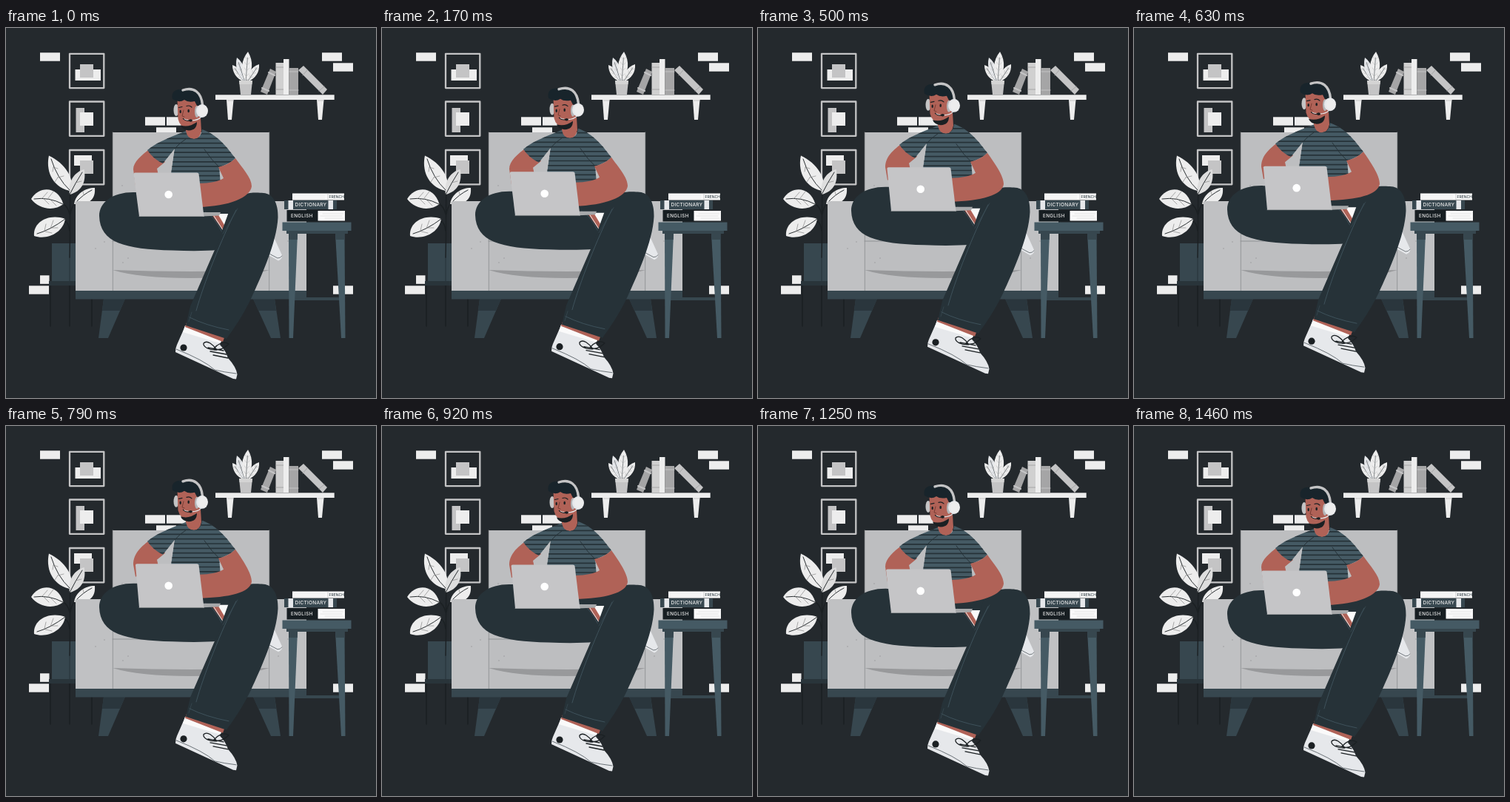
An HTML page with a canvas for the animation above (1.5 s loop, 500x500 px).

```html
<!DOCTYPE html>
<html lang="en">
<head>
<meta charset="utf-8">
<style>
html, body { margin: 0; width: 100%; height: 100%; overflow: hidden; background: #24292d; }
canvas { display: block; width: 500px; height: 500px; }
</style>
</head>
<body>
<canvas id="stage" width="500" height="500"></canvas>
<script>
const ctx = document.getElementById('stage').getContext('2d');
const LOOP = 1500, PEAK = 738, LIFT = 9.3;
const C = {
  bg: '#24292d', white: '#ededed', pale: '#e6e8eb', light: '#c4c4c5', chair: '#bdbec0',
  mid: '#a5a5a6', steel: '#455a64', slate: '#37474f', navy: '#263238', skin: '#b06257', ink: '#1b2023'
};

const rect = (x, y, w, h, color) => { ctx.fillStyle = color; ctx.fillRect(x, y, w, h); };
const fill = (d, color) => { ctx.fillStyle = color; ctx.fill(new Path2D(d)); };
const line = (d, color, width = 1) => {
  ctx.strokeStyle = color;
  ctx.lineWidth = width;
  ctx.stroke(new Path2D(d));
};
const oval = (x, y, rx, ry, color, turn = 0) => {
  ctx.fillStyle = color;
  ctx.beginPath();
  ctx.ellipse(x, y, rx, ry, turn, 0, Math.PI * 2);
  ctx.fill();
};
const label = (text, x, y, size, color, gap = 0) => {
  ctx.font = `500 ${size}px Inter, sans-serif`;
  ctx.letterSpacing = gap + 'px';
  ctx.textAlign = 'left';
  ctx.fillStyle = color;
  ctx.fillText(text, x, y);
};

// A pointed leaf along a vein, with short side veins.
function leaf(x0, y0, x1, y1, width, color, veins) {
  ctx.save();
  ctx.translate(x0, y0);
  ctx.rotate(Math.atan2(y1 - y0, x1 - x0));
  const n = Math.hypot(x1 - x0, y1 - y0), w = width * 0.67;
  fill(`M0 0C${n * .35} ${-w} ${n * .7} ${-w} ${n} 0C${n * .7} ${w} ${n * .35} ${w} 0 0`, color);
  line(`M0 0L${n * .8} 0`, '#5a6064', .7);
  for (let i = 1; i <= veins; i++) {
    const x = n * i / (veins + 1.5), s = width * .25;
    line(`M${x + 4} ${-s}L${x} 0L${x + 4} ${s}`, '#b5b5b5', .5);
  }
  ctx.restore();
}

function wall() {
  rect(0, 0, 500, 500, C.bg);
  [[46, 33], [427, 33], [442, 47], [188, 120], [217, 120], [203, 134], [31, 348], [442, 348]]
    .forEach(([x, y]) => rect(x, y + .3, 27, 11.4, C.white));
  rect(46, 334.3, 12.5, 11.5, C.white);
  for (const y of [34.8, 99.5, 165]) {
    ctx.strokeStyle = C.light;
    ctx.lineWidth = 2.3;
    ctx.strokeRect(86, y, 46.3, 46.3);
  }
  rect(93.5, 56, 34.5, 15, C.white);
  rect(100, 49, 18, 18, C.light);
  rect(94.5, 108, 11.5, 33, C.light);
  rect(100, 114, 18, 18, C.white);
  rect(92, 172, 24, 14, C.white);
  rect(100, 179, 18, 18, C.light);
}

function shelf() {
  leaf(322, 73, 306, 50, 9, C.white, 3);
  leaf(326, 73, 342, 49, 10, C.white, 3);
  leaf(323, 73, 312, 40, 10, C.pale, 3);
  leaf(324, 73, 327, 32, 13, C.white, 4);
  fill('M315 71H333L331 90H317Z', C.light);
  fill('M315 71H333L332.4 76H315.6Z', '#d4d4d4');
  fill('M344 86L357 55L365 59L353 90Z', C.mid);
  line('M346 81L355 85M355 60L363 64', C.light, 2);
  rect(364.5, 47, 10.5, 43, '#d0d0d0');
  line('M365 53H375M365 83H375', C.mid, 1);
  rect(375, 42, 7.5, 48, C.white);
  rect(382.5, 54, 12.5, 36, C.mid);
  line('M383 59H395M383 84H395', C.light, 1);
  fill('M395 57L402 51L434 83L428 90Z', C.light);
  line('M401 64L407 57M423 85L430 79', C.mid, 1);
  rect(283, 90.3, 160.7, 6.7, C.white);
  for (const x of [298, 420]) {
    fill(`M${x} 97h9.5l-2.5 27h-5Z`, C.white);
    line(`M${x + 1} 98h8`, C.light, 1);
  }
}

function plant() {
  line('M60 345V403M86 345V403M116 345V403', C.ink, 1.6);
  rect(62, 291, 54, 52, C.slate);
  line('M86 310V342', C.navy, 1);
  rect(58, 342, 60, 6, '#29343a');
  line('M87 212C86 245 87 270 86 310M76 237Q84 241 86 252M79 260Q85 263 86 275M94 236Q88 242 87 252', C.ink, 1.4);
  fill('M58 172.5C54 190 60 214 86 220C95 205 79 182 58 172.5', C.white);
  fill('M86 225C83 206 94 194 105.5 191C109 208 102 221 86 225', '#dedede');
  fill('M34 231C45 213 70 213 77.5 238C65 248 44 245 34 231', C.white);
  fill('M38 281C36 263 57 250 80 258C77 277 55 287 38 281', C.white);
  fill('M92 238C94 224 107 216 120 216C121 230 115 239 92 238', C.white);
  line('M61 177Q69 203 86 219M38 231Q58 228 77 238M42 278Q60 273 80 258M103 195Q94 209 86 225M116 219Q104 225 94 236', '#2b3033', 1);
  line('M64 188L63 194M70 202L66 208M64 188L70 190M70 202L78 200M49 230L56 222M57 230L64 221M50 230L58 238M59 231L68 240M52 274L54 265M60 271L64 260M53 275L62 277M62 270L70 270M94 209L102 207M105 225L104 221', '#777', .6);
}

function armchair() {
  rect(144, 141, 212, 215, C.chair);
  rect(94, 234, 50, 122, '#c0c1c3');
  rect(356, 234, 50, 122, '#c0c1c3');
  line('M144.3 141V355M355.7 141V355', '#8f9295', .9);
  line('M144 288H356', '#8f9295', 1);
  fill('M144 327Q250 331 356 327Q320 338 250 338Q180 338 144 327', '#98999b');
  [[158, 317], [165, 311], [121, 298], [133, 289], [157, 213], [368, 311], [381, 288]]
    .forEach(([x, y]) => oval(x, y, .7, .7, '#929497'));
  fill('M132 366H161L138 419H125Z', C.slate);
  fill('M334 366H363L371 419H358Z', C.slate);
  fill('M132 366H161L154 382H130Z', '#2a363d');
  fill('M334 366H363L365 382H341Z', '#2a363d');
  rect(94, 355, 312, 11.5, C.slate);
}

function table() {
  rect(386, 364, 69, 4, C.slate);
  fill('M382 278H394L388 419H382.5Z', C.steel);
  fill('M445 278H457.5L458.5 419H453Z', C.steel);
  fill('M382 278H394L393.7 286H382Z', C.slate);
  fill('M445 278H457.5V286H445.5Z', C.slate);
  rect(379, 273, 83, 5, C.slate);
  rect(373.5, 262.5, 93, 11.5, C.steel);

  rect(387, 223.5, 70, 9, '#fafafa');
  line('M389 227H431M389 230H431', '#dcdcdc', .6);
  line('M435 224V232', C.light, .8);
  label('FRENCH', 436.5, 230.3, 5, '#344148');
  rect(376, 233, 71, 12, C.slate);
  rect(381.5, 233, 6.5, 12, C.pale);
  rect(435.5, 233, 6.5, 12, C.pale);
  label('DICTIONARY', 390.5, 241.4, 6.5, C.white, .25);
  rect(379.5, 246, 43, 15.5, '#171e22');
  rect(421.5, 247, 36.5, 13.5, '#fafafa');
  line('M428 251H456M425 254H454M431 257H456', '#d5d5d5', .6);
  label('ENGLISH', 385, 256.2, 6.3, C.white, .35);
}

function shoe() {
  fill('M242 403L293 419L289 428Q297 436 300 446Q311 458 312.5 468L311 474.5L307 474L229 438Q229 432 231 428Z', C.pale);
  fill('M242 402L293 419L289 426L239 411Z', '#fafafa');
  fill('M244 398L296 416L293 424L242 404Z', C.skin);
  line('M230 434Q268 449 282 462Q294 465 311 467', '#4b545a', .8);
  oval(240, 432, 4.6, 4.6, C.ink);
  line('M285 435C275 436 266 431 267 426C272 421 280 428 285 435M281 433C289 437 297 431 301 427C294 422 285 428 281 433M273 432L294 436M276 437L298 441M280 442L300 446', C.ink, 1.3);
}

function legs() {
  fill('M357 280L363 285L373 307Q374 312 368 314.5L346 302Z', C.pale);
  line('M352 303L367 311Q371 311 373 308', '#555c61', .8);
  fill('M175 222H310V296Q285 303 225 300.5C160 299 127 290 126 254C126 235 145 221 175 222Z', C.navy);
  fill('M277 251L287 251L303 271L295 276Z', C.skin);
  fill('M286 251H306V270L298 271Z', '#fafafa');
  line('M281 254L295 276', C.white, 1);
  line('M270 249Q281 254 292 276', C.steel, .7);
  shoe();

  fill('M306 235C317 221 337 222 348 223C361 224 368 237 367.5 256C366 290 344 338 331 366C320 389 308 406 298 420L243 402L249 376L285 293Z', C.navy);
  line('M311 246C291 285 267 346 257 382', C.steel, .8);
  line('M248 391Q270 402 301 408', C.steel, .8);
  line('M313 244L293 278M251 384L247 397', '#3a4b54', .7);
}

function torso(drop) {
  fill('M243 128L263 122L264 139Q262 150 253 151Q245 151 243 147Z', C.skin);
  const elbow = 191 + drop;
  fill(`M196 162C183 172 172 181 172 ${elbow}L175 213L206 199L204 190L215 181Z`, C.skin);

  const shirt = 'M243 139C225 147 207 152 191 165Q199 177 212 183L228 163L221 211H290L288 188Q302 184 310 176C300 163 286 144 265 137Q264 149 254 150Q245 150 243 139Z';
  fill(shirt, C.steel);
  ctx.save();
  ctx.clip(new Path2D(shirt));
  for (let y = 143; y < 212; y += 6.3) line(`M185 ${y}H315`, C.navy, 1.7);
  ctx.restore();
  line('M228 163Q235 155 243 150M268 164Q278 179 289 189', C.navy, 1);

  const low = 214 + drop;
  fill(`M287 188Q301 185 310 176C319 189 332 ${low - 12} 332 ${low}C330 ${low + 15} 302 241 260 242V210C276 210 288 207 294 203Z`, C.skin);
}

function head() {
  oval(230, 111, 3.5, 8, C.light);
  fill('M231.5 96H261L262 124Q256 135 246 136Q235 134 232.5 123Z', C.skin);
  fill('M236 131.5Q247 135 258 127Q258 138 247 138.5Q238 137.5 236 131.5', C.ink);
  fill('M225 96C223 88 227 82 238 83C253 81 264 88 265 105H258L255 99Q246 101 241 97Q234 102 225 96', '#18242b');
  line('M239 84C254 79 264 87 265.5 104', C.light, 3.4);
  oval(258, 113, 3, 8, '#b5b6b8');
  oval(265, 112, 8, 9, C.pale);
  oval(266, 112, 6.3, 7.5, C.white);
  line('M264 120Q259 125 251 125', C.pale, 1.2);
  oval(249.5, 125, 2.4, 1.8, C.ink);
  oval(235.7, 113, 1.2, 2.2, C.ink);
  oval(246.7, 112, 1.3, 2.2, C.ink);
  line('M233.5 107.5L238 106.5M244 105.5Q248 104 251 107', C.ink, 1.2);
  line('M240 111L238 119L241 120', '#71382f', .9);
  line('M239.5 122.5Q243 126 248 125', C.ink, 1.4);
  line('M241 123Q243 124.4 246 124.3', '#fff', .8);
}

function laptop(lift) {
  const x = 172.5 + lift * 2.5;
  fill('M262 249H290L288 253.5L266 254.5Z', '#a6a8aa');
  fill(`M${x} 197Q${x} 195.5 ${x + 2} 195.5H258Q260 195.5 260.5 197L267.5 254.5H180Z`, '#c5c5c7');
  line('M180 254.5H267.5', '#a9abad', .7);
  oval(219.7, 225, 5.3, 5.3, '#fff');
}

function draw(now) {
  const lift = (1 + Math.cos(2 * Math.PI * (now % LOOP - PEAK) / LOOP)) / 2;
  wall();
  shelf();
  plant();
  armchair();
  ctx.save();
  ctx.translate(0, -LIFT * lift);
  legs();
  torso(LIFT * lift * .6);
  head();
  laptop(lift);
  ctx.restore();
  table();
  requestAnimationFrame(draw);
}

ctx.lineCap = ctx.lineJoin = 'round';
requestAnimationFrame(draw);
</script>
</body>
</html>
```
